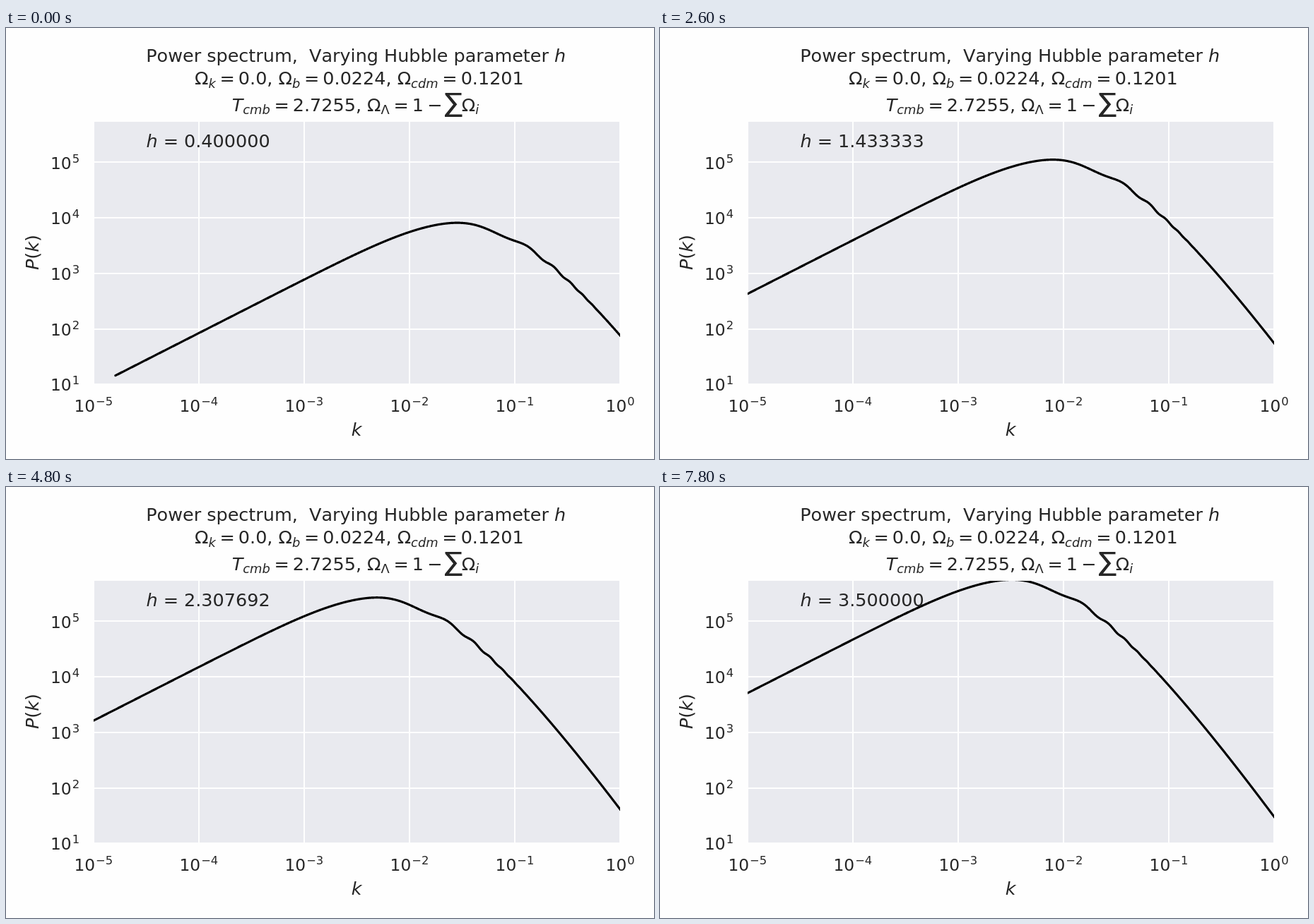
An HTML page with a canvas that plays this animation: 917x611 px, repeating every 8 s.

```html
<!DOCTYPE html>
<html lang="en">
<head>
<meta charset="utf-8">
<title>Power spectrum</title>
<style>
  html, body { margin: 0; width: 100%; height: 100%; overflow: hidden; background: #fefefe; }
  canvas { display: block; }
</style>
</head>
<body>
<canvas id="stage" width="917" height="611"></canvas>
<script>
const ctx = document.getElementById('stage').getContext('2d');
const INK = '#262626', PAPER = '#fefefe', PANEL = '#e9eaef';
const PT = 917 / 6 / 72, EM = 12 * PT, TICK = 11 * PT;
const STEP = 200, COUNT = 40, H_MIN = 0.4, H_MAX = 3.5;
const BOX = { x: 124, y: 133, w: 745, h: 372 };
const xOf = lg => 123.9 + 149.05 * (lg + 5);
const yOf = lg => 505.2 - 78.7 * (lg - 1);

// Cosmology: physical densities stay fixed while h varies
const OB = 0.0224, OM = OB + 0.1201, NS = 0.966;
const TH2 = (2.7255 / 2.7) ** 2, FB = OB / OM, FC = 1 - FB;

// Eisenstein-Hu transfer function
const transfer = (() => {
  const { sqrt, log, exp, sin, E } = Math;
  const zEq = 2.5e4 * OM / TH2 ** 2, kEq = 0.0746 * OM / TH2;
  const d1 = 0.313 * OM ** -0.419 * (1 + 0.607 * OM ** 0.674);
  const d2 = 0.238 * OM ** 0.223;
  const zD = 1291 * OM ** 0.251 / (1 + 0.659 * OM ** 0.828) * (1 + d1 * OB ** d2);
  const ratio = z => 31.5 * OB / TH2 ** 2 * 1000 / z;
  const rD = ratio(zD), rEq = ratio(zEq);
  const s = 2 / (3 * kEq) * sqrt(6 / rEq) *
    log((sqrt(1 + rD) + sqrt(rD + rEq)) / (1 + sqrt(rEq)));
  const kSilk = 1.6 * OB ** 0.52 * OM ** 0.73 * (1 + (10.4 * OM) ** -0.95);

  const a1 = (46.9 * OM) ** 0.67 * (1 + (32.1 * OM) ** -0.532);
  const a2 = (12 * OM) ** 0.424 * (1 + (45 * OM) ** -0.582);
  const alphaC = a1 ** -FB * a2 ** -(FB ** 3);
  const b1 = 0.944 / (1 + (458 * OM) ** -0.708), b2 = (0.395 * OM) ** -0.0266;
  const betaC = 1 / (1 + b1 * (FC ** b2 - 1));

  const y = (1 + zEq) / (1 + zD), r = sqrt(1 + y);
  const g = y * (-6 * r + (2 + 3 * y) * log((r + 1) / (r - 1)));
  const alphaB = 2.07 * kEq * s * (1 + rD) ** -0.75 * g;
  const betaB = 0.5 + FB + (3 - 2 * FB) * sqrt((17.2 * OM) ** 2 + 1);
  const node = 8.41 * OM ** 0.435;

  const t0 = (q, a, b) => {
    const l = log(E + 1.8 * b * q);
    return l / (l + (14.2 / a + 386 / (1 + 69.9 * q ** 1.08)) * q * q);
  };
  return k => {
    const q = k / (13.41 * kEq), ks = k * s;
    const f = 1 / (1 + (ks / 5.4) ** 4);
    const cold = f * t0(q, 1, betaC) + (1 - f) * t0(q, alphaC, betaC);
    const arg = ks / (1 + (node / ks) ** 3) ** (1 / 3);
    const wave = t0(q, 1, 1) / (1 + (ks / 5.2) ** 2) +
      alphaB / (1 + (betaB / ks) ** 3) * exp(-((k / kSilk) ** 1.4));
    return FB * wave * sin(arg) / arg + FC * cold;
  };
})();

function integrate(f, n = 400) {
  let sum = 0;
  for (let i = 0; i < n; i++) sum += f((i + 0.5) / n);
  return sum / n;
}

function growth(h) {
  const m = OM / h ** 2;
  return 5 * m * integrate(u => u ** 4 / (m + (1 - m) * u ** 6) ** 1.5);
}

// Smallest wavenumber follows the conformal age
function minK(h) {
  const m = OM / h ** 2, rad = 4.18e-5 / h ** 2;
  const age = 2997.9 / h * integrate(u => 2 * u / Math.sqrt(m * u * u + (1 - m) * u ** 8 + rad));
  return 0.1 / age;
}

// Fitting-formula power with a gentle small-scale boost
function power(k) {
  const bump = Math.exp(-((Math.log(k / 0.055) / 0.6) ** 2));
  const lift = 1 + 0.029 * k * k / (k * k + 0.0009) + 0.028 * bump;
  return 1369.5 * (k / 4e-5) ** NS * transfer(k) ** 2 * lift;
}

function spectrum(h) {
  const scale = h ** 3 * growth(h) ** 2;
  const start = Math.max(-5.02, Math.log10(minK(h) / h));
  const n = 1500, pts = [];
  for (let i = 0; i <= n; i++) {
    const lg = start + (0.02 - start) * i / n;
    pts.push([xOf(lg), yOf(Math.log10(scale * power(h * 10 ** lg)))]);
  }
  return pts;
}

// Text
function put(str, x, y, size = EM, italic = false) {
  ctx.font = `${italic ? 'italic ' : ''}${size}px "DejaVu Sans", sans-serif`;
  ctx.fillText(str, x, y);
  return x + ctx.measureText(str).width;
}
const sub = (str, x, y, italic = true) => put(str, x, y + 4.3, EM * 0.7, italic) + 0.7;
const op = (str, x, y) => put(str, x + 5, y) + 5;

function term(name, index, value, x, y) {
  x = put(name, x, y, EM, name === 'T');
  x = sub(index, x, y, index !== 'Λ');
  return put(value, op('=', x, y), y);
}

function fillPath(pts) {
  ctx.beginPath();
  pts.forEach(([x, y]) => ctx.lineTo(x, y));
  ctx.fill();
}

function titles() {
  ctx.fontKerning = 'none';
  put('h', put('Power spectrum,  Varying Hubble parameter ', 198.2, 48.4), 48.4, EM, true);
  ctx.fontKerning = 'normal';

  let x = term('Ω', 'k', '0.0, ', 267, 80.4);
  x = term('Ω', 'b', '0.0224, ', x, 80.4);
  term('Ω', 'cdm', '0.1201', x, 80.4);

  x = term('T', 'cmb', '2.7255, ', 319.7, 117.6);
  x = term('Ω', 'Λ', '1', x, 117.6);
  op('−', x, 117.6);
  fillPath([[621.5, 92], [644.5, 92], [644.5, 95.3], [627.5, 95.3], [638.3, 108.3],
    [627, 122.4], [645.5, 122.4], [645.5, 126], [621, 126], [621, 123.2], [633, 108.5], [621.5, 94.6]]);
  sub('i', put('Ω', 644.7, 117.6), 117.6);
}

function tick(exp, x, y) {
  put(exp, put('10', x, y, TICK) + 1, y - 9, TICK * 0.7);
}

function labels() {
  for (let e = -5; e <= 0; e++) {
    tick(String(e).replace('-', '−'), xOf(e) - (e ? 27.5 : 20.6), 544);
  }
  for (let e = 1; e <= 5; e++) tick(String(e), 63, yOf(e) + 9.2);

  put('k', 488.7, 578, EM, true);
  ctx.save();
  ctx.translate(46.3, 343.1);
  ctx.rotate(-Math.PI / 2);
  let x = put('P', 0, 0, EM, true);
  x = put('(', x, 0);
  x = put('k', x, 0, EM, true);
  put(')', x, 0);
  ctx.restore();
}

function draw(h) {
  ctx.fillStyle = PAPER;
  ctx.fillRect(0, 0, 917, 611);

  ctx.save();
  ctx.beginPath();
  ctx.rect(BOX.x, BOX.y, BOX.w, BOX.h);
  ctx.clip();
  ctx.fillStyle = PANEL;
  ctx.fillRect(BOX.x, BOX.y, BOX.w, BOX.h);
  ctx.fillStyle = PAPER;
  for (let e = -5; e <= 0; e++) ctx.fillRect(Math.round(xOf(e)) - 1, BOX.y, 2, BOX.h);
  for (let e = 1; e <= 5; e++) ctx.fillRect(BOX.x, Math.round(yOf(e)) - 1, BOX.w, 2);

  ctx.strokeStyle = '#000';
  ctx.lineWidth = 1.5 * PT;
  ctx.lineCap = ctx.lineJoin = 'round';
  ctx.beginPath();
  spectrum(h).forEach(([x, y]) => ctx.lineTo(x, y));
  ctx.stroke();
  ctx.restore();

  ctx.fillStyle = INK;
  titles();
  labels();
  put(' = ' + h.toFixed(6), put('h', 198.4, 168.8, EM, true), 168.8);
}

let shown = -1;
const begin = performance.now();
function loop() {
  const t = Math.max(0, performance.now() - begin);
  const i = Math.floor(t / STEP) % COUNT;
  if (i !== shown) {
    shown = i;
    draw(H_MIN + (H_MAX - H_MIN) * i / (COUNT - 1));
  }
  requestAnimationFrame(loop);
}
loop();
</script>
</body>
</html>
```
